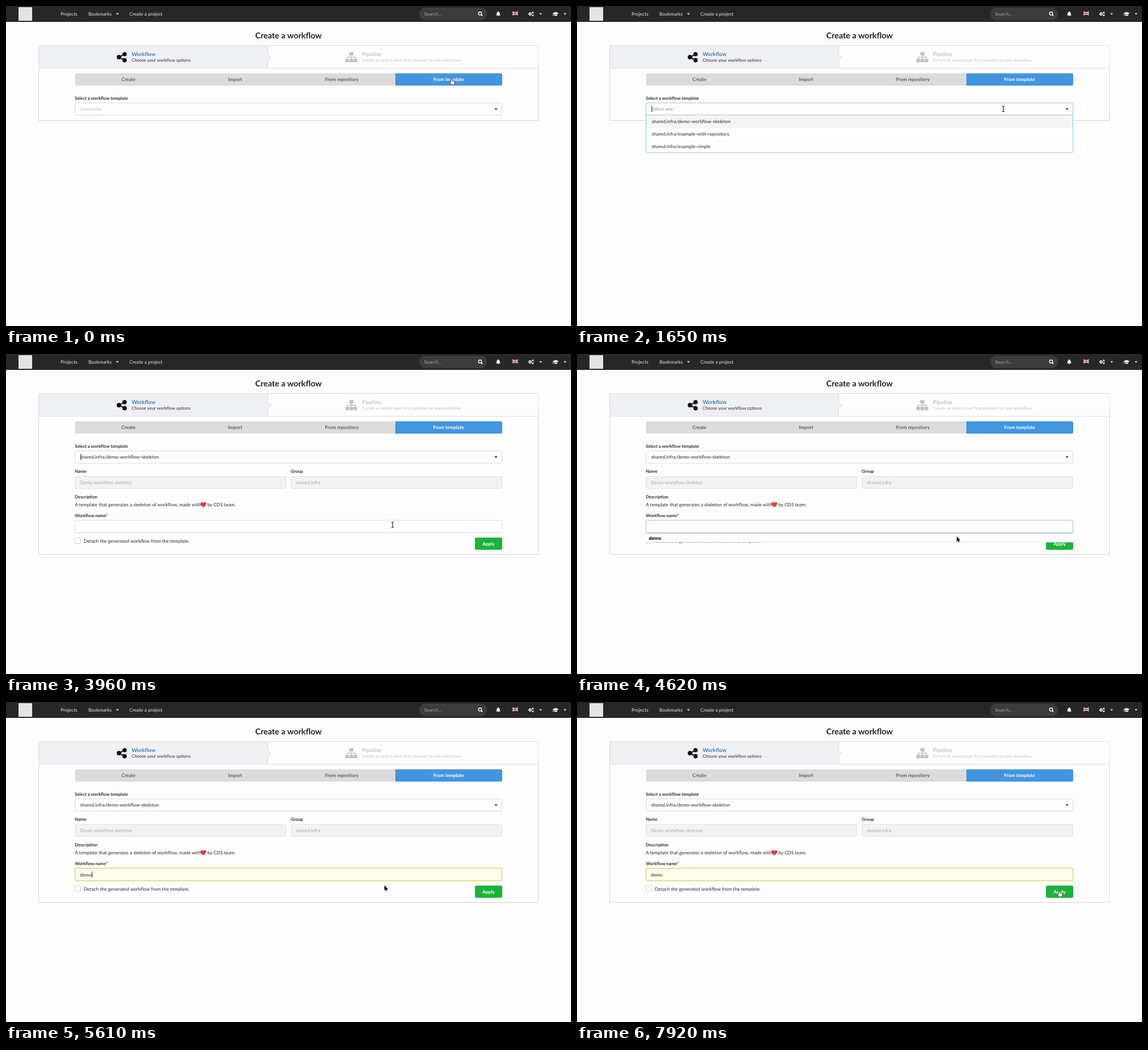
Animation, 994 px wide and 563 px high, one loop 8 s. Source, as an HTML page with a canvas:

```html
<!DOCTYPE html>
<html lang="en">
<head>
<meta charset="utf-8">
<title>Create a workflow</title>
<style>
html, body { margin: 0; width: 100%; height: 100%; overflow: hidden; background: #fdfdfd; }
canvas { display: block; }
</style>
</head>
<body>
<canvas id="stage" width="994" height="563"></canvas>
<script>
const ctx = document.getElementById('stage').getContext('2d');
const LOOP = 8000, STEP = 330;
const BODY = 8.35, SMALL = 7.73;
const INK = '#2b2b2b', LINE = '#dcdddd', PAGE = '#fdfdfd', FOCUS = '#96c8da';
const TEMPLATES = ['demo-workflow-skeleton', 'example-with-repository', 'example-simple']
  .map(name => 'shared.infra/' + name);

// Steps at which the page changes state
const HOVER = 3, OPENING = 4, OPEN = 5, CLOSING = 8, FILLED = 9,
      NAMING = 13, PREVIEW = 15, NAMED = 17;

// Pointer kind, x, y, caret visible
const POSES = [
  ['hand', 785, 133, 0], ['hand', 785, 133, 0], ['arrow', 773, 162, 0],
  ['beam', 757, 181, 0], ['beam', 750, 181, 1], ['beam', 750, 181, 1],
  ['hand', 739, 204, 0], ['hand', 731, 211, 1], ['hand', 731, 211, 1],
  ['arrow', 729, 206, 1], ['arrow', 722, 222, 0], ['beam', 692, 296, 1],
  ['beam', 680, 300.5, 1], ['beam', 679, 303, 1], ['arrow', 668, 321, 0],
  ['arrow', 666.6, 322, 1], ['arrow', 666, 322.3, 0], ['arrow', 665.8, 322.6, 1],
  ['arrow', 665.8, 322.6, 0], ['arrow', 688.5, 319.5, 0], ['arrow', 793, 320, 1],
  ['arrow', 819.5, 324.5, 0], ['hand', 849, 335, 0], ['hand', 849.5, 336.5, 1],
  ['hand', 849.5, 337.2, 0]
];

const HAND = new Path2D('M2.4 1Q3.3 -.3 4.1 1V4L7.4 4.7Q8.8 5.1 8.5 6.5L7.7 10.6H3.2L.5 7.2Q.2 5.8 1.4 6L2.4 7Z');
const ARROW = new Path2D('M0 0V9.2L2.1 7.3L3.5 10.3L4.9 9.7L3.6 6.8H6.4Z');
const BELL = new Path2D('M-4 2.6Q-2.6 1.4-2.6-1Q-2.6-3.2-.5-3.6V-4.3H.5V-3.6Q2.6-3.2 2.6-1Q2.6 1.4 4 2.6ZM-1.1 3.1H1.1Q.9 4.2 0 4.2T-1.1 3.1Z');
const CAP = new Path2D('M-5.5-1L0-3.4L5.5-1L0 1.4ZM-3 .8L0 2.2L3 .8V2.6Q0 4.6-3 2.6ZM-5-.8H-4.4V3.4H-5.2Z');
const HEART = new Path2D('M0 4.6C-2-3.8 0 0 0 4.6ZM0 4.8C-7 .2-5.6-4.4-2.8-4.4Q-.8-4.4 0-2.4Q.8-4.4 2.8-4.4C5.6-4.4 7 .2 0 4.8Z');

function text(str, x, y, { size = BODY, color = INK, weight = 400, align = 'left', font = 'Lato' } = {}) {
  ctx.font = `${weight} ${size}px ${font}, sans-serif`;
  ctx.textAlign = align;
  ctx.fillStyle = color;
  ctx.fillText(str, x, y);
}

const label = (str, x, y) => text(str, x, y, { size: SMALL, weight: 700 });

function rect(x, y, w, h, color) {
  ctx.fillStyle = color;
  ctx.fillRect(x, y, w, h);
}

function box(x, y, w, h, { fill, stroke, r = 2.4, lineWidth = 1 } = {}) {
  ctx.beginPath();
  ctx.roundRect(x, y, w, h, r);
  if (fill) { ctx.fillStyle = fill; ctx.fill(); }
  if (stroke) { ctx.strokeStyle = stroke; ctx.lineWidth = lineWidth; ctx.stroke(); }
}

function line(points, color, width = 1) {
  ctx.beginPath();
  points.forEach(([x, y]) => ctx.lineTo(x, y));
  ctx.strokeStyle = color;
  ctx.lineWidth = width;
  ctx.stroke();
}

function disc(x, y, r, color) {
  ctx.beginPath();
  ctx.arc(x, y, r, 0, Math.PI * 2);
  ctx.fillStyle = color;
  ctx.fill();
}

function shape(path, x, y, fill, outline, width = 0.9) {
  ctx.save();
  ctx.translate(x, y);
  ctx.fillStyle = fill;
  ctx.strokeStyle = outline || fill;
  ctx.lineWidth = width;
  ctx.lineJoin = 'round';
  if (outline) ctx.stroke(path);
  ctx.fill(path);
  ctx.restore();
}

function triangle(x, y, color) {
  ctx.beginPath();
  ctx.moveTo(x - 2.5, y - 1.2);
  ctx.lineTo(x + 2.5, y - 1.2);
  ctx.lineTo(x, y + 1.6);
  ctx.fillStyle = color;
  ctx.fill();
}

function cog(x, y, r, color) {
  disc(x, y, r * 0.8, color);
  for (let i = 0; i < 4; i++) {
    const a = i * Math.PI / 4, dx = Math.cos(a) * r, dy = Math.sin(a) * r;
    line([[x - dx, y - dy], [x + dx, y + dy]], color, r * 0.45);
  }
  disc(x, y, r * 0.35, '#272727');
}

function flag(x, y, w, h) {
  rect(x, y, w, h, '#3a4480');
  for (const [color, width] of [['#f0f0f0', 1.5], ['#d0414d', 0.5]]) {
    line([[x, y], [x + w, y + h]], color, width);
    line([[x + w, y], [x, y + h]], color, width);
  }
  for (const [color, width] of [['#f0f0f0', 2.4], ['#d0414d', 1.3]]) {
    line([[x + w / 2, y], [x + w / 2, y + h]], color, width);
    line([[x, y + h / 2], [x + w, y + h / 2]], color, width);
  }
}

function navbar() {
  const light = '#e6e6e6';
  rect(0, 0, 994, 28, '#272727');
  rect(22, 2, 24, 24, '#e4e4e4');
  text('Projects', 96, 16.8, { color: light });
  text('Bookmarks', 145, 16.8, { color: light });
  triangle(196, 14, light);
  text('Create a project', 217, 16.8, { color: light });
  box(727, 3, 119, 22, { fill: '#3c3c3c', r: 11 });
  text('Search...', 735.5, 17, { color: '#a0a0a0' });
  ctx.beginPath();
  ctx.arc(834, 13.2, 2.7, 0, Math.PI * 2);
  ctx.strokeStyle = '#fff';
  ctx.lineWidth = 1.4;
  ctx.stroke();
  line([[836, 15.2], [838.2, 17.4]], '#fff', 1.6);
  shape(BELL, 866, 13.8, '#fff');
  flag(891, 10, 9.5, 6);
  cog(922, 14, 3, '#fff');
  cog(926.8, 11.6, 1.7, '#fff');
  cog(926.8, 16.3, 1.7, '#fff');
  triangle(940.5, 14, light);
  shape(CAP, 967, 13.8, '#fff');
  triangle(983.5, 14, light);
}

function shareIcon() {
  line([[208.3, 84.8], [199, 90], [208.3, 95.3]], '#111', 2);
  disc(208.6, 84.7, 3.8, '#111');
  disc(208.6, 95.4, 3.8, '#111');
  disc(198.8, 90, 4, '#111');
}

function sitemapIcon() {
  const c = '#c2c2c2';
  box(604, 81, 7.2, 6, { fill: c, r: 0.8 });
  for (const x of [597, 604.2, 611.4]) box(x, 93, 6.6, 6, { fill: c, r: 0.8 });
  line([[607.6, 86], [607.6, 94]], c, 1.4);
  line([[600.3, 94], [600.3, 90], [614.7, 90], [614.7, 94]], c, 1.4);
}

function header(bottom) {
  text('Create a workflow', 497, 57.2, { size: 14.3, weight: 700, align: 'center', color: '#222' });
  rect(57, 69, 404, 41, '#eff0f4');
  box(57.5, 109.5, 879, bottom - 109, { stroke: '#d6d7d8', r: 0 });
  box(57.5, 69.5, 879, 40, { stroke: LINE, r: [2.4, 2.4, 0, 0] });
  line([[460.5, 70], [460.5, 109]], LINE);
  ctx.beginPath();
  ctx.moveTo(460, 84);
  ctx.lineTo(466, 90);
  ctx.lineTo(460, 96);
  ctx.fillStyle = '#eff0f4';
  ctx.fill();
  line([[460.5, 84], [466.3, 90], [460.5, 96]], LINE);
  shareIcon();
  text('Workflow', 221, 87.6, { size: 9.45, weight: 700, color: '#3a7fc0' });
  text('Choose your workflow options', 221, 98.4, { size: SMALL });
  sitemapIcon();
  text('Pipeline', 626.3, 87.6, { size: 9.45, weight: 700, color: '#c4c4c4' });
  text('Create or select your first pipeline for you workflow', 626.3, 98.4, { size: SMALL, color: '#c8c8c8' });
}

function tabs() {
  box(121.5, 118.5, 751.5, 21.5, { fill: '#dadbdb' });
  box(685, 118.5, 188, 21.5, { fill: '#4295de', r: [0, 2.4, 2.4, 0] });
  ['Create', 'Import', 'From repository', 'From template'].forEach((name, i) =>
    text(name, 215.3 + i * 187.8, 132, { weight: 700, align: 'center', color: i === 3 ? '#fff' : '#5e5e5e' }));
}

function form(step) {
  label('Name', 121, 209.2);
  label('Group', 501, 209.2);
  for (const [x, value] of [[121.5, 'Demo workflow skeleton'], [501.5, 'shared.infra']]) {
    box(x, 215.5, 371, 21, { fill: '#f2f2f2', stroke: '#e2e2e2' });
    text(value, x + 8.5, 229.2, { color: '#aaa' });
  }
  label('Description', 121, 253.6);
  text('A template that generates a skeleton of workflow, made with', 121, 267.8);
  shape(HEART, 347.2, 265, '#e2374a');
  text('by CDS team.', 354.2, 267.8);
  label('Workflow name*', 121, 286.8);

  box(121.5, 323.5, 10, 10, { fill: '#fff', stroke: '#d2d3d4', r: 1.5 });
  text('Detach the generated workflow from the template.', 136.8, 331.8);
  box(825, 323, 48, 21.5, { fill: '#1bb33b' });
  text('Apply', 849, 336.8, { weight: 700, align: 'center', color: '#fff' });

  const typed = step >= PREVIEW;
  const border = typed ? '#e3d16c' : step >= NAMING ? FOCUS : LINE;
  box(121.5, 292.5, 751, 22, { fill: typed ? '#fdfdea' : PAGE, stroke: border, lineWidth: typed ? 1.3 : 1 });
  if (typed) text('demo', 130, 306.8);
  if (step >= NAMING && step < NAMED) suggestion(typed);
}

function suggestion(active) {
  rect(121, 315.5, 752, 15.8, active ? '#a8cdfa' : '#fff');
  line([[121, 315.5], [873, 315.5]], '#c5cdd2', 0.8);
  line([[121, 331], [873, 331]], active ? '#b4cbe6' : '#d5d5d5', 0.6);
  text('demo', 126.3, 326.6, { size: 8, weight: 700, color: '#000', font: 'Inter' });
}

function menu(scale, alpha) {
  ctx.save();
  ctx.globalAlpha = alpha;
  ctx.translate(0, 192);
  ctx.scale(1, scale);
  box(121.5, 0, 751, 66, { fill: '#fff', stroke: alpha > 0.5 ? FOCUS : '#eee', r: [0, 0, 2.4, 2.4] });
  if (alpha > 0.5) rect(122, 0.5, 750, 21.5, '#f4f4f4');
  TEMPLATES.forEach((name, i) => {
    if (i) line([[122, i * 22 + 0.5], [872, i * 22 + 0.5]], '#f6f6f6');
    text(name, 131.5, 14.2 + i * 22);
  });
  ctx.restore();
}

function select(step) {
  const open = step >= OPENING && step < CLOSING;
  const filled = step >= CLOSING;
  const border = open ? FOCUS : step === HOVER ? '#bcbdbd' : step === CLOSING ? '#a4a5a6' : LINE;
  label('Select a workflow template', 121, 164.6);
  box(121.5, 170.5, 751, 21.5, { fill: PAGE, stroke: border, r: open ? [2.4, 2.4, 0, 0] : 2.4 });
  triangle(862, 181.3, '#222');
  text(filled ? TEMPLATES[0] : 'Select one', 130.5, 184.2,
    { color: filled ? INK : open ? '#999' : '#c4c4c4' });
  if (step === OPENING) menu(0.72, 0.75);
  else if (open) menu(1, 1);
  else if (step === CLOSING) menu(0.29, 0.4);
}

function caret(step) {
  if (step < NAMING) rect(131, 176, 0.9, 10.5, '#111');
  else if (step < NAMED) rect(130.3, 298.5, 0.9, 10.5, '#111');
  else rect(151, 298.5, 0.9, 10.5, '#111');
}

function pointer(kind, x, y) {
  if (kind === 'hand') {
    shape(HAND, x - 4.4, y - 5.2, '#fff', '#111', 1.5);
  } else if (kind === 'arrow') {
    shape(ARROW, x, y, '#000', '#fff');
  } else {
    line([[x, y - 4.5], [x, y + 4.5]], '#111', 1.1);
    for (const d of [-1, 1]) {
      line([[x - 2.3, y + d * 5], [x, y + d * 4.2], [x + 2.3, y + d * 5]], '#111', 1);
    }
  }
}

function draw(time) {
  const step = Math.floor(time % LOOP / STEP);
  const [kind, x, y, caretOn] = POSES[step];
  ctx.textRendering = 'geometricPrecision';
  rect(0, 0, 994, 563, PAGE);
  navbar();
  header(step >= CLOSING ? 352 : 201);
  tabs();
  if (step >= CLOSING) form(step);
  select(step);
  if (caretOn) caret(step);
  pointer(kind, x, y);
}

const start = performance.now();
function tick() {
  draw(performance.now() - start);
  requestAnimationFrame(tick);
}
tick();
</script>
</body>
</html>
```
